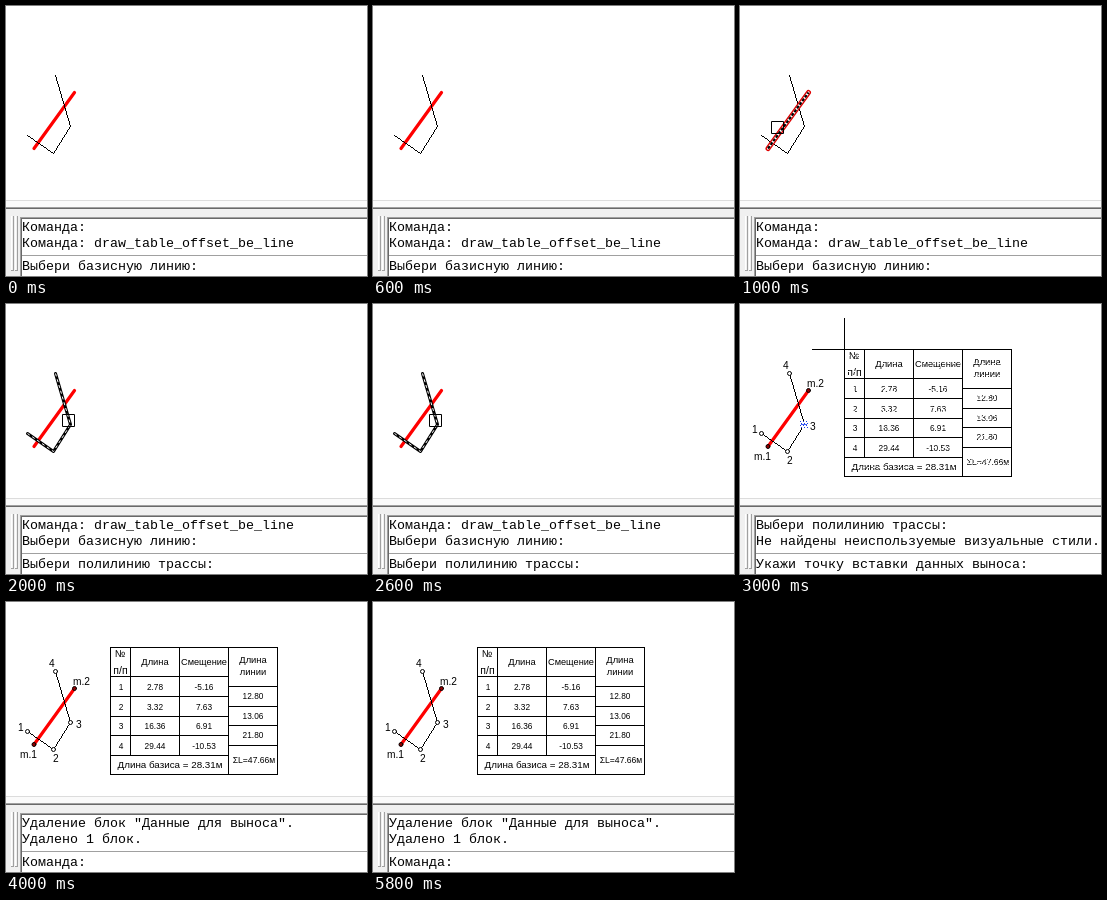
These frames come from a looping animation (361x270 px, 7000 ms). An HTML page with a canvas:

```html
<!DOCTYPE html>
<html lang="ru">
<head>
<meta charset="utf-8">
<style>
html, body { margin: 0; width: 100%; height: 100%; overflow: hidden; background: #fff; }
canvas { display: block; }
</style>
</head>
<body>
<canvas id="stage" width="361" height="270"></canvas>
<script>
const ctx = document.getElementById('stage').getContext('2d');
const MONO = '13.333px "Liberation Mono", monospace';
const SANS = '"Liberation Sans", sans-serif';
const LOOP = 7000;
const starts = [0, 1000, 2000, 3000, 4000];
const route = [[49, 69], [64, 120], [47, 147], [21, 129]];
const base = [[27.5, 142], [68, 86]];
const log = [
  ['Команда:', 'Команда: draw_table_offset_be_line', 'Выбери базисную линию:'],
  ['Команда:', 'Команда: draw_table_offset_be_line', 'Выбери базисную линию:'],
  ['Команда: draw_table_offset_be_line', 'Выбери базисную линию:', 'Выбери полилинию трассы:'],
  ['Выбери полилинию трассы:', 'Не найдены неиспользуемые визуальные стили.', 'Укажи точку вставки данных выноса:'],
  ['Удаление блок "Данные для выноса".', 'Удалено 1 блок.', 'Команда:']
];
const rows = [['1', '2.78', '-5.16'], ['2', '3.32', '7.63'], ['3', '16.36', '6.91'], ['4', '29.44', '-10.53']];

function rect(x, y, w, h, color = '#000') {
  ctx.fillStyle = color;
  ctx.fillRect(x, y, w, h);
}

function text(str, x, y, size, align = 'center') {
  ctx.font = size + 'px ' + SANS;
  ctx.textAlign = align;
  ctx.fillText(str, x, y);
}

function stroke(points, color, width, dash = []) {
  ctx.strokeStyle = color;
  ctx.lineWidth = width;
  ctx.lineCap = dash.length ? 'butt' : 'round';
  ctx.lineJoin = 'round';
  ctx.setLineDash(dash);
  ctx.beginPath();
  points.forEach(([x, y]) => ctx.lineTo(x + .5, y + .5));
  ctx.stroke();
  ctx.setLineDash([]);
}

// One-pixel line without smoothing
function thin(points) {
  for (let i = 1; i < points.length; i++) {
    const [x0, y0] = points[i - 1], [x1, y1] = points[i];
    const n = Math.max(Math.abs(x1 - x0), Math.abs(y1 - y0));
    for (let k = 0; k <= n; k++) {
      rect(Math.round(x0 + (x1 - x0) * k / n), Math.round(y0 + (y1 - y0) * k / n), 1, 1);
    }
  }
}

function dot([x, y], fill, r = 2) {
  ctx.beginPath();
  ctx.arc(x + .5, y + .5, r, 0, Math.PI * 2);
  ctx.fillStyle = fill;
  ctx.fill();
  ctx.strokeStyle = '#000';
  ctx.lineWidth = 1;
  ctx.stroke();
}

function pickBox(x, y) {
  ctx.strokeStyle = '#000';
  ctx.lineWidth = 1;
  ctx.strokeRect(x + .5, y + .5, 12, 12);
}

function panel(lines) {
  rect(0, 194, 361, 1, '#dcdcdc');
  rect(0, 195, 361, 75, '#f0f0f0');
  rect(0, 195, 361, 6, '#fafafa');
  rect(0, 201, 361, 1, '#a0a0a0');
  rect(0, 202, 361, 1, '#696969');
  for (const x of [5, 9]) {
    rect(x, 210, 1, 54, '#fff');
    rect(x + 2, 210, 1, 55, '#a0a0a0');
    rect(x, 264, 2, 1, '#a0a0a0');
  }
  rect(14, 211, 347, 59, '#a0a0a0');
  rect(15, 212, 346, 58, '#696969');
  rect(16, 213, 345, 57, '#fff');
  rect(16, 249, 345, 1, '#a0a0a0');
  ctx.font = MONO;
  ctx.textAlign = 'left';
  ctx.fillStyle = '#000';
  lines.forEach((s, i) => ctx.fillText(s, 16, [225, 241, 264][i]));
}

// Broken strokes of the table while it is being dragged
const sketch = (() => {
  const tile = document.createElement('canvas');
  tile.width = 5;
  tile.height = 4;
  const t = tile.getContext('2d');
  t.fillRect(0, 0, 5, 3);
  t.fillRect(0, 3, 3, 1);
  return ctx.createPattern(tile, 'repeat');
})();

function table(dragged) {
  for (const y of [45, 172]) rect(104, y, 168, 1);
  for (const y of [74, 94, 114, 133, 153]) rect(104, y, 118, 1);
  for (const y of [84, 104, 123, 143]) rect(222, y, 50, 1);
  for (const x of [104, 222, 271]) rect(x, 45, 1, 128);
  for (const x of [124, 173]) rect(x, 45, 1, 109);

  ctx.fillStyle = dragged ? sketch : '#000';
  text('№', 114, 55, 10);
  text('п/п', 114.5, 72, 10.5);
  text('Длина', 149, 63, 9.4);
  text('Смещение', 198, 63, 9.2);
  text('Длина', 247, 61, 9.4);
  text('линии', 247, 73, 9.4);
  rows.forEach((row, i) => row.forEach((s, j) =>
    text(s, [115, 149, 198][j], 88 + Math.round(i * 19.7), 8.3)));
  ['12.80', '13.06', '21.80'].forEach((s, i) => text(s, 247, 97 + Math.round(i * 19.7), 8.3));
  text('Длина базиса = 28.31м', 164, 166, 9.8);
  text('ΣL=47.66м', 248, 161, 8.6);
}

function labels() {
  ctx.fillStyle = '#000';
  const put = (s, x, y) => text(s, x, y, 10.2, 'left');
  put('4', 43, 65);
  put('m.2', 67, 83);
  put('3', 70, 126);
  put('1', 12, 129);
  put('2', 47, 160);
  put('m.1', 14, 156);
}

function plan(step) {
  if (step === 1) {
    thin(route);
    stroke(base, '#e00000', 5);
    stroke(base, '#fff', 2.2);
    stroke(base, '#000', 2.2, [3, 1.5]);
    pickBox(31, 115);
    return;
  }
  stroke(base, '#f00', 3.2);
  if (step === 2) {
    stroke(route, '#000', 3);
    stroke(route, '#fff', 1, [3, 3]);
    pickBox(56, 110);
    return;
  }
  thin(route);
  if (step < 3) return;
  route.forEach(p => dot(p, '#fff'));
  base.forEach(p => dot(p, '#900000'));
  labels();
  if (step === 3) {
    rect(61, 117, 8, 7, '#fff');
    for (let y = 117; y < 124; y += 2) {
      for (let x = 60; x < 68; x += 3) rect(x + (y - 117) / 2 % 2, y, 1, 1, '#2040e0');
    }
    rect(61, 120, 6, 1, '#4060ff');
    rect(104, 14, 1, 32);
    rect(72, 45, 33, 1);
  }
}

function draw(step) {
  rect(0, 0, 361, 270, '#fff');
  plan(step);
  if (step >= 3) table(step === 3);
  panel(log[step]);
}

const origin = performance.now();
let shown = -1;
function tick() {
  const t = (performance.now() - origin) % LOOP;
  const step = starts.filter(s => s <= t).length - 1;
  if (step !== shown) draw(shown = step);
  requestAnimationFrame(tick);
}
tick();
</script>
</body>
</html>
```
